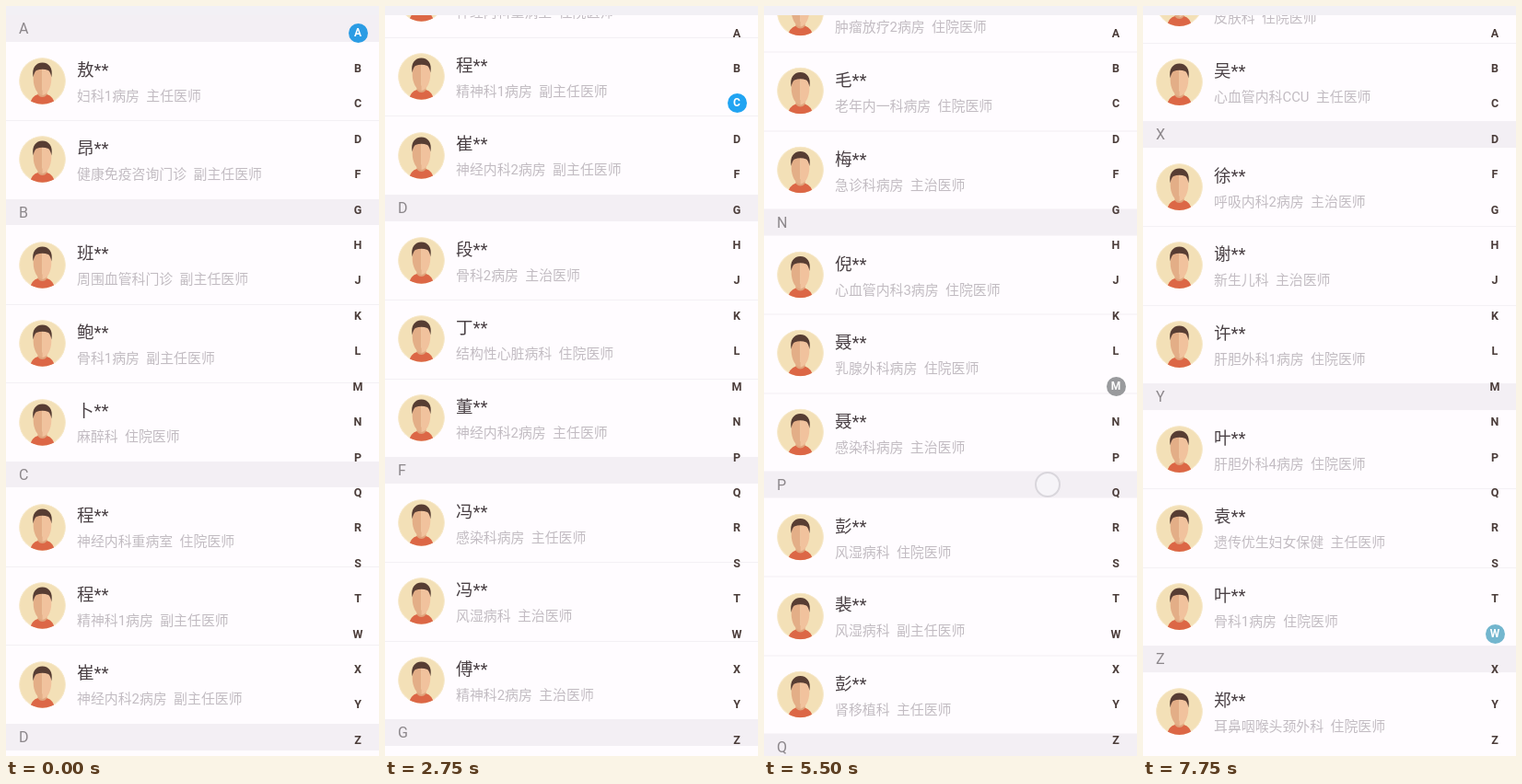
An HTML page that plays this animation: 405x815 px, repeating every 8000 ms.

```html
<!DOCTYPE html>
<html lang="zh-CN">
<head>
<meta charset="utf-8">
<style>
html, body { margin: 0; width: 100%; height: 100%; overflow: hidden; background: #fffcff; }
body { position: relative; font-family: Roboto, "Noto Sans CJK SC", "Noto Sans CJK", sans-serif; }
#view { position: absolute; inset: 10px 0 0; overflow: hidden; }
#bar { position: absolute; inset: 0 0 auto; height: 10px; background: #f2f0f5; }
.head { height: 28.6px; line-height: 29px; padding-left: 14px; background: #f3eff4; color: #8c878b; font-size: 16px; }
.row { position: relative; height: 85.53px; white-space: pre; }
.row + .row::before { content: ""; position: absolute; inset: 0 0 auto; height: 1px; background: #f3f0f4; }
.row svg { position: absolute; left: 14px; top: 17.3px; width: 51px; height: 51px; }
.name, .info { position: absolute; left: 77px; }
.name { top: 19px; font-size: 18.5px; line-height: 24px; color: #4a4145; }
.info { top: 49px; font-size: 14.9px; line-height: 20px; color: #c2bcc2; }
.key { position: absolute; left: 371.5px; width: 21px; height: 21px; border-radius: 50%;
  font: bold 12.5px/21px Roboto, sans-serif; text-align: center; color: #4b3d3a; }
.key.on { color: #fff; font-size: 12px; }
#touch { position: absolute; width: 24px; height: 24px; margin: -14px; border: 2px solid #d9d6dc;
  border-radius: 50%; background: #faf8fb88; }
</style>
</head>
<body>
<div id="view"><div id="list"></div></div>
<div id="bar"></div>
<div id="keys"></div>
<div id="touch"></div>
<svg width="0" height="0" style="position:absolute">
  <clipPath id="disc"><circle r="25.3"/></clipPath>
  <symbol id="face" viewBox="-25.5 -25.5 51 51">
    <g clip-path="url(#disc)">
      <circle r="25.5" fill="#f3e0b7" stroke="#f8ecd3" stroke-width="2"/>
      <path d="M-13.5 26Q-12.5 17-5 14.5H5Q12.5 17 13.5 26Z" fill="#dc6746"/>
      <path d="M-5 10H5V15Q0 20-5 15Z" fill="#dfa47c"/>
      <path d="M0-17C-8-17-9.8-11-9.8-2C-9.8 7-5 15.5 0 15.5Z" fill="#e3ae87"/>
      <path d="M0-17C8-17 9.8-11 9.8-2C9.8 7 5 15.5 0 15.5Z" fill="#f1c29d"/>
      <path d="M-9.8-4C-12-14-7-20 0-20C7-20 12-14 9.8-4C9.3-8 8-10.5 6.5-11.5Q0-14-6.5-11.5C-8-10.5-9.3-8-9.8-4Z" fill="#573d33"/>
    </g>
  </symbol>
</svg>
<script>
const ROW = 85.53, HEAD = 28.6, STEP = 250, LOOP = 8000;

// One section per line: letter, then surname, department and title of each doctor.
const sections = `A|敖 妇科1病房 主任医师|昂 健康免疫咨询门诊 副主任医师
B|班 周围血管科门诊 副主任医师|鲍 骨科1病房 副主任医师|卜 麻醉科 住院医师
C|程 神经内科重病室 住院医师|程 精神科1病房 副主任医师|崔 神经内科2病房 副主任医师
D|段 骨科2病房 主治医师|丁 结构性心脏病科 住院医师|董 神经内科2病房 主任医师
F|冯 感染科病房 主任医师|冯 风湿病科 主治医师|傅 精神科2病房 主治医师
G|高 儿科 主治医师|郭 皮肤科 住院医师|顾 麻醉科 主任医师
H|何 骨科1病房 住院医师|黄 急诊科病房 主治医师|胡 妇科1病房 副主任医师
J|金 风湿病科 住院医师|贾 医务部.病案室 主任医师|蒋 精神科1病房 住院医师
K|孔 神经内科1病房 住院医师|孔 血液内科1病房 住院医师|孔 耳鼻咽喉头颈外科 住院医师
L|林 呼吸内科RCU 主治医师|罗 内分泌代谢科病房 主治医师|林 血液内科1病房 主治医师
M|莫 肿瘤放疗2病房 住院医师|毛 老年内一科病房 住院医师|梅 急诊科病房 主治医师
N|倪 心血管内科3病房 住院医师|聂 乳腺外科病房 住院医师|聂 感染科病房 主治医师
P|彭 风湿病科 住院医师|裴 风湿病科 副主任医师|彭 肾移植科 主任医师
Q|秦 儿科 住院医师|邱 麻醉科 主治医师|钱 皮肤科 主任医师
R|任 妇科1病房 住院医师|阮 急诊科病房 主治医师|任 骨科1病房 主治医师
S|孙 待分配 副主任医师|沈 肿瘤放疗2病房 主治医师|邵 结构性心脏病科 住院医师
T|唐 神经内科1病房 住院医师|唐 儿科 住院医师|陶 周围血管科 主任医师
W|吴 消化内科门诊 教授|吴 皮肤科 住院医师|吴 心血管内科CCU 主任医师
X|徐 呼吸内科2病房 主治医师|谢 新生儿科 主治医师|许 肝胆外科1病房 住院医师
Y|叶 肝胆外科4病房 住院医师|袁 遗传优生妇女保健 主任医师|叶 骨科1病房 住院医师
Z|郑 耳鼻咽喉头颈外科 住院医师`.split("\n").map(line => line.split("|"));

// Scroll offset over time
const path = [[0, 0], [1000, 0], [1500, 56.5], [2000, 370], [2750, 575], [3250, 850], [4000, 1510],
  [4750, 2030.4], [5500, 2840.5], [6750, 4145.8], [7750, 4931.9], [8000, 5010]];
// Finger: end time, x, y, final opacity
const swipes = [[1500, 297, 588, 1], [3500, 301, 570, 1], [4750, 305, 552, 1],
  [5500, 308, 520, 1], [6750, 316, 495, .3]];
const tints = { A: "#2b9ce4", M: "#999a9d", R: "#298dc7", W: "#73b6ce" };

const $ = id => document.getElementById(id);
const rowHtml = text => {
  const [name, dept, title] = text.split(" ");
  return `<div class="row"><svg><use href="#face"/></svg>` +
    `<div class="name">${name}**</div><div class="info">${dept}  ${title}</div></div>`;
};
$("list").innerHTML = sections.map(([letter, ...rows]) =>
  `<section><div class="head">${letter}</div>${rows.map(rowHtml).join("")}</section>`).join("");
$("keys").innerHTML = sections.map(([letter], i) =>
  `<div class="key" style="top:${18.5 + 38.42 * i}px">${letter}</div>`).join("");
const keys = [...$("keys").children];

let end = 0;
const starts = sections.map(s => {
  const start = end;
  end += HEAD + ROW * (s.length - 1);
  return start;
});

// Monotone cubic interpolation
const slope = i => path[i + 1] ? (path[i + 1][1] - path[i][1]) / (path[i + 1][0] - path[i][0]) : 0;
const tangent = i => {
  const a = i ? slope(i - 1) : 0, b = slope(i);
  return a && b ? 2 * a * b / (a + b) : 0;
};
function scrollAt(t) {
  const i = path.findLastIndex(p => p[0] <= t);
  const [t0, y0] = path[i], [t1, y1] = path[i + 1];
  const d = t1 - t0, u = (t - t0) / d, v = 1 - u;
  return y0 * v * v * (1 + 2 * u) + y1 * u * u * (3 - 2 * u) +
    d * u * v * (v * tangent(i) - u * tangent(i + 1));
}

function draw(now) {
  const t = Math.floor(now % LOOP / STEP) * STEP;
  const y = scrollAt(t);
  $("list").style.transform = `translateY(${-y}px)`;

  const current = starts.findLastIndex(s => s <= y);
  keys.forEach((key, i) => {
    key.classList.toggle("on", i === current);
    key.style.background = i === current ? tints[key.textContent] || "#21a4f2" : "";
  });

  const swipe = swipes.find(([at]) => t <= at && t >= at - STEP);
  const touch = $("touch").style;
  touch.opacity = 0;
  if (swipe) {
    const [at, x, top, fade] = swipe;
    touch.left = x + "px";
    touch.top = top + (at - t) * .15 + "px";
    touch.opacity = t === at ? fade : 1;
  }
  requestAnimationFrame(draw);
}
draw(0);
</script>
</body>
</html>
```
